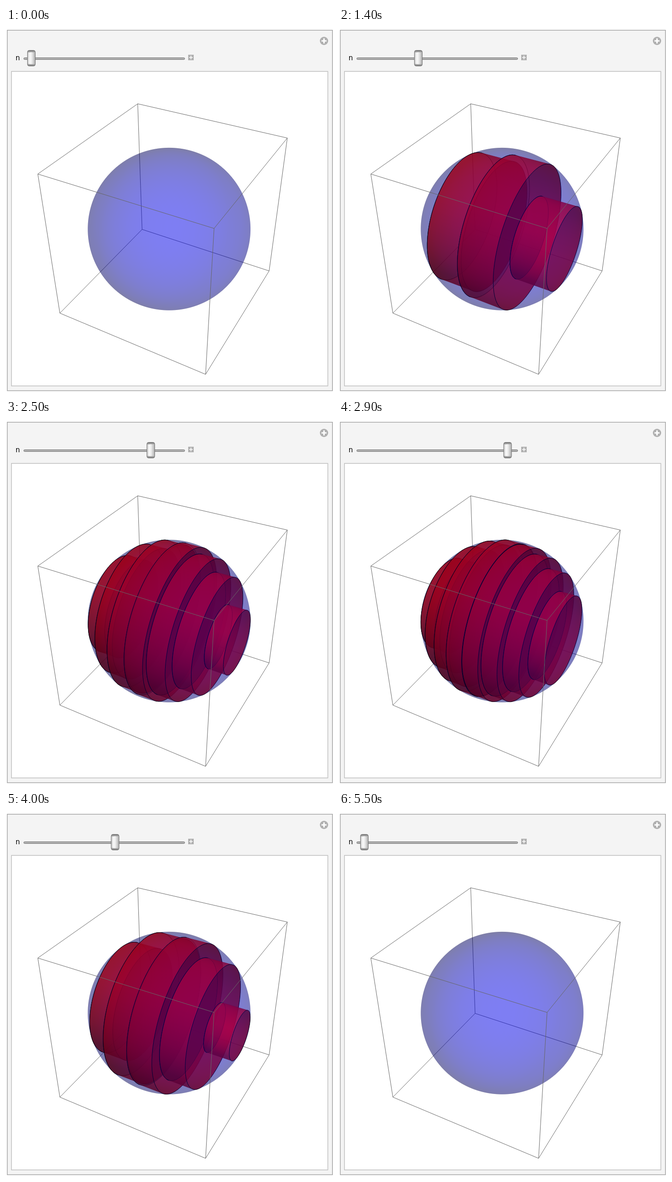
Recreate the animation shown at these times as an HTML page with a canvas. Size 709 by 790 pixels, loop 6000 ms.

```html
<!DOCTYPE html>
<html lang="en">
<head>
<meta charset="utf-8">
<title>Sphere filled with cylinders</title>
<style>
html, body { margin: 0; width: 100%; height: 100%; overflow: hidden; background: #fff; }
#stage { position: relative; width: 709px; height: 790px; }
svg, canvas { position: absolute; left: 0; top: 0; display: block; }
</style>
</head>
<body>
<div id="stage">
<svg width="709" height="790" viewBox="0 0 709 790">
  <defs>
    <linearGradient id="body">
      <stop offset="0" stop-color="#c4c4c4"/>
      <stop offset=".3" stop-color="#fafafa"/>
      <stop offset=".55" stop-color="#ececec"/>
      <stop offset="1" stop-color="#adadad"/>
    </linearGradient>
    <linearGradient id="cap" x2="0" y2="1">
      <stop offset="0" stop-color="#777"/>
      <stop offset="1" stop-color="#c4c4c4"/>
    </linearGradient>
  </defs>
  <rect x="2.75" y="4.75" width="705" height="782.5" fill="#f4f4f4" stroke="#a6a6a6" stroke-width="1.5"/>
  <rect x="11.75" y="94.25" width="686" height="682.5" fill="#fff" stroke="#bfbfbf" stroke-width="1.5"/>
  <circle cx="689.5" cy="28" r="9" fill="#b0b0b0"/>
  <path d="M684 28h11M689.5 22.5v11" stroke="#fff" stroke-width="3"/>
  <rect x="395" y="58" width="12" height="12" fill="#b0b0b0"/>
  <path d="M397 64h8M401 60v8" stroke="#fff" stroke-width="1.6"/>
  <text x="20.7" y="70" font-family="'DejaVu Sans', sans-serif" font-size="15">n</text>
  <rect x="38.5" y="64.5" width="349" height="4" rx="2" fill="#b2b2b2" stroke="#747474"/>
  <g id="thumb">
    <rect x="-8.5" y="48.5" width="17" height="34" rx="4" fill="url(#body)"/>
    <path id="lid" d="M-8.5 54V52.5q0-4 4-4h9q4 0 4 4V54q-8.5-3-17 0z" fill="url(#cap)"/>
    <use href="#lid" transform="matrix(1 0 0 -1 0 131)"/>
    <rect x="-8.5" y="48.5" width="17" height="34" rx="4" fill="none" stroke="#6c6c6c"/>
  </g>
</svg>
<canvas id="scene" width="709" height="790"></canvas>
</div>
<script>
const ctx = document.getElementById('scene').getContext('2d');
const thumb = document.getElementById('thumb');

// Camera: unit sphere at the origin inside a box of half side H
const H = 1.04, CX = 353.7, CY = 436.3, FOCAL = 1229;
const EYE = [1.3, -2.4, 2].map(v => v * 2 * H);
const DIST = Math.hypot(...EYE);
const SPHERE_ALPHA = 0.3, SOLID_ALPHA = 0.6;

const dot = (a, b) => a[0] * b[0] + a[1] * b[1] + a[2] * b[2];
const unit = v => { const l = Math.hypot(...v); return v.map(c => c / l); };
const TOWARD = unit(EYE);
const RIGHT = unit([2.4, 1.3, 0]);
const UP = unit(TOWARD.map((c, i) => (i === 2 ? 1 : 0) - TOWARD[2] * c));

const toView = p => [dot(p, RIGHT), dot(p, UP), dot(p, TOWARD)];
function project(p) {
  const [x, y, z] = toView(p), s = FOCAL / (DIST - z);
  return [CX + x * s, CY - y * s];
}

// Coloured lights fixed to the viewer
const LIGHTS = [[1.5, -0.5, 2], [1.5, 1.5, 3], [-0.5, 1.5, 2], [-0.5, -0.5, 2]].map(unit);
const BLUE = { ambient: 0.2, power: [0.5, 0.18, 0, 0.18] };
const RED = { ambient: 0.4, power: [0, 0.18, 0.5, 0] };
const shade = (m, n) => Math.min(1, LIGHTS.reduce(
  (sum, l, i) => sum + m.power[i] * Math.max(0, dot(l, n)), m.ambient));
const redOf = n => `rgba(${Math.round(255 * shade(RED, n))},0,0,${SOLID_ALPHA})`;

// One translucent half of the sphere: side 1 is near, -1 is far
const SIZE = 360, LEFT = 174, TOP = 256;
const OUTLINE = FOCAL / Math.sqrt(DIST * DIST - 1);
function makeHemisphere(side) {
  const layer = document.createElement('canvas');
  layer.width = layer.height = SIZE;
  const g = layer.getContext('2d'), img = g.createImageData(SIZE, SIZE);
  for (let j = 0; j < SIZE; j++) for (let i = 0; i < SIZE; i++) {
    const x = LEFT + i + 0.5 - CX, y = CY - TOP - j - 0.5;
    const cover = Math.min(1, OUTLINE - Math.hypot(x, y) + 0.5);
    if (cover <= 0) continue;
    const a = x * x + y * y + FOCAL * FOCAL, b = DIST * FOCAL;
    const root = Math.sqrt(Math.max(0, b * b - a * (DIST * DIST - 1)));
    const t = (b - side * root) / a;
    const n = [x * t, y * t, DIST - FOCAL * t].map(c => c * side);
    const o = 4 * (j * SIZE + i);
    img.data[o + 2] = 255 * shade(BLUE, n);
    img.data[o + 3] = 255 * SPHERE_ALPHA * cover;
  }
  g.putImageData(img, 0, 0);
  return layer;
}
const nearHalf = makeHemisphere(1), farHalf = makeHemisphere(-1);

const corner = (x, y, z) => project([x * H, y * H, z * H]);
function boxEdges(hub, ends) {
  ctx.strokeStyle = '#666';
  ctx.lineWidth = 1;
  ctx.beginPath();
  for (const end of ends) {
    ctx.moveTo(...corner(...hub));
    ctx.lineTo(...corner(...end));
  }
  ctx.stroke();
}
function farEdges() {
  boxEdges([-1, 1, -1], [[-1, 1, 1], [1, 1, -1], [-1, -1, -1]]);
  boxEdges([-1, 1, 1], [[1, 1, 1], [-1, -1, 1]]);
  boxEdges([-1, -1, -1], [[-1, -1, 1], [1, -1, -1]]);
  boxEdges([1, 1, -1], [[1, 1, 1], [1, -1, -1]]);
}
const nearEdges = () => boxEdges([1, -1, 1], [[-1, -1, 1], [1, 1, 1], [1, -1, -1]]);

const TAU = 2 * Math.PI;
const DISC_RED = redOf(toView([1, 0, 0]));
const FACING = Math.atan2(EYE[2], EYE[1]), REACH = Math.hypot(EYE[1], EYE[2]);
const rim = (x, r, a) => project([x, r * Math.cos(a), r * Math.sin(a)]);

function arc(x, r, from, to) {
  const steps = 72;
  for (let i = 0; i <= steps; i++) ctx.lineTo(...rim(x, r, from + (to - from) * i / steps));
}
function strokeArc(x, r, from, to) {
  ctx.strokeStyle = '#000';
  ctx.lineWidth = 1;
  ctx.beginPath();
  arc(x, r, from, to);
  ctx.stroke();
}
function disc(x, r) {
  ctx.fillStyle = DISC_RED;
  ctx.beginPath();
  arc(x, r, 0, TAU);
  ctx.fill();
  strokeArc(x, r, 0, TAU);
}

// Curved wall between two angles, shaded across the axis
function wall(x0, x1, r, from, to, side) {
  const mid = (x0 + x1) / 2;
  const p = project([x0, 0, 0]), q = project([x1, 0, 0]);
  const len = Math.hypot(q[0] - p[0], q[1] - p[1]);
  const nx = (p[1] - q[1]) / len, ny = (q[0] - p[0]) / len;
  const start = rim(mid, r, from);
  const across = a => {
    const s = rim(mid, r, a);
    return (s[0] - start[0]) * nx + (s[1] - start[1]) * ny;
  };
  const span = across(to);
  const fill = ctx.createLinearGradient(start[0], start[1], start[0] + nx * span, start[1] + ny * span);
  for (let i = 0; i <= 20; i++) {
    const a = from + (to - from) * i / 20;
    const n = toView([0, side * Math.cos(a), side * Math.sin(a)]);
    fill.addColorStop(Math.min(1, Math.max(0, across(a) / span)), redOf(n));
  }
  ctx.fillStyle = fill;
  ctx.beginPath();
  arc(x0, r, from, to);
  arc(x1, r, to, from);
  ctx.fill();
}

function cylinder(x0, x1) {
  const r = Math.sqrt(1 - Math.max(x0 * x0, x1 * x1));
  const w = Math.acos(r / REACH);
  disc(x0, r);
  wall(x0, x1, r, FACING + w, FACING + TAU - w, -1);
  wall(x0, x1, r, FACING - w, FACING + w, 1);
  strokeArc(x0, r, FACING - w, FACING + w);
  disc(x1, r);
}

function draw(n) {
  ctx.clearRect(0, 0, 709, 790);
  farEdges();
  ctx.drawImage(farHalf, LEFT, TOP);
  const step = 2 / n;
  for (let i = 1; i < Math.floor(n); i++) cylinder(-1 + i * step, -1 + (i + 1) * step);
  ctx.drawImage(nearHalf, LEFT, TOP);
  nearEdges();
  thumb.setAttribute('transform', `translate(${55 + 317 * (n - 1) / 9} 0)`);
}

// n climbs from 1 towards 10 in 25 ticks, then returns the same way
function tickAt(ms) {
  if (ms < 500 || ms >= 5500) return 0;
  const j = Math.floor((ms - 500) / 100);
  return j < 25 ? j + 1 : 50 - j;
}
const valueAt = k => k ? 10 - 0.3662 * (25.5 - k) : 1;

let shown = -1;
const began = performance.now();
function frame() {
  const k = tickAt((performance.now() - began) % 6000);
  if (k !== shown) draw(valueAt(shown = k));
  requestAnimationFrame(frame);
}
frame();
</script>
</body>
</html>
```
